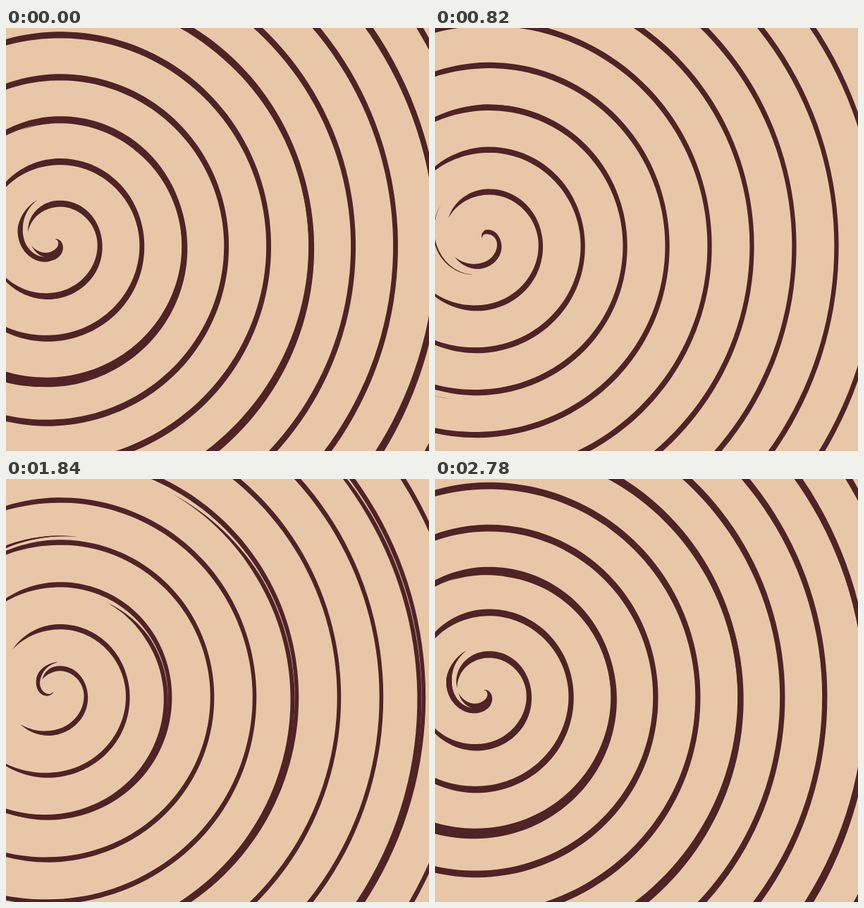
An HTML page with a canvas for the animation above (2.8 s loop, 600 by 600 pixels).

```html
<!DOCTYPE html>
<html lang="en">
<head>
<meta charset="utf-8">
<title>Spiral</title>
<style>
  html, body { margin: 0; width: 100%; height: 100%; overflow: hidden; background: #e8c7a8; }
  canvas { display: block; width: 600px; height: 600px; }
</style>
</head>
<body>
<canvas id="stage" width="600" height="600"></canvas>
<script>
const ctx = document.getElementById('stage').getContext('2d');
const PAPER = '#e8c7a8', INK = '#502327';
const CX = 67.5, CY = 300;
const PITCH = 60;        // distance between turns
const R0 = 65.3;         // radius at angle 0 when the loop starts
const BAND = 180;        // stray strokes repeat at this radius
const CROSSING = 183;    // where a stray stroke crosses the main line
const FULL = 7.4;        // full line weight
const LOOP = 2800, BEAT = 140, STEPS = 60;

const clamp = v => Math.min(1, Math.max(0, v));
const cosDeg = a => Math.cos(a * Math.PI / 180);
const sinDeg = a => Math.sin(a * Math.PI / 180);
const bell = (x, mid, spread) => Math.exp(-(((x - mid) / spread) ** 2));

// Fills a band of changing width along a polar curve; angles in degrees, clockwise.
function ribbon(from, to, radius, width) {
  const n = Math.ceil((to - from) / 2);
  let last = null;
  ctx.beginPath();
  for (let i = 0; i <= n; i++) {
    const a = from + (to - from) * i / n;
    const r = radius(a);
    if (r < 2) continue;
    const h = Math.max(0, width(a, r)) / 2;
    const c = cosDeg(a), s = sinDeg(a);
    const edge = [
      [CX + (r + h) * c, CY + (r + h) * s],
      [CX + (r - h) * c, CY + (r - h) * s]
    ];
    if (last) {
      ctx.moveTo(...last[0][0]);
      for (const e of last.slice(1)) ctx.lineTo(...e[0]);
      ctx.lineTo(...edge[0]);
      ctx.lineTo(...edge[1]);
      for (const e of last.slice(1).reverse()) ctx.lineTo(...e[1]);
      ctx.lineTo(...last[0][1]);
      ctx.closePath();
    }
    // Neighbouring pieces overlap by one segment, so no seams show.
    last = last ? [last[last.length - 1], edge] : [edge];
  }
  ctx.fill();
}

// The line is thinner to the right and fades out towards the left.
function mainWidth(angle, weight) {
  const d = Math.abs(((angle % 360) + 540) % 360 - 180);
  const top = weight * 1.33;
  if (d < 90) return top + (weight - top) * cosDeg(d) ** 6;
  const thin = clamp((FULL - weight) / 4);
  const limit = 118 + 60 * (1 - thin) ** 2;
  return top * (1 - clamp((d - 90) / (limit - 90)) ** 1.5);
}

// Stray strokes open wider than the main line and cross it once in every band.
function stray(base, start, end, weight, taper) {
  if (weight <= 0 || end <= start) return;
  for (let k = -1; k <= 3; k++) {
    const radius = a => {
      const r = base + BAND * k + PITCH * a / 360;
      return r + (r - CROSSING - BAND * k) / 3;
    };
    const width = (a, r) =>
      Math.min(weight * clamp((a - start) / taper) * clamp((end - a) / 50), r * 0.4);
    ribbon(start, end, radius, width);
  }
}

function draw(step) {
  const weight = FULL - 2.5 * bell(step, 10, 8) - 3.9 * bell(step, 46, 7);
  const grow = PITCH * step / (STEPS - 1) - 0.6 * (FULL - weight);
  const base = R0 + grow;

  ctx.fillStyle = PAPER;
  ctx.fillRect(0, 0, 600, 600);
  ctx.fillStyle = INK;

  const angleAt = r => (r - base) / PITCH * 360;
  ribbon(angleAt(2.5), angleAt(625),
    a => base + PITCH * a / 360,
    (a, r) => Math.min(mainWidth(a, weight), r * 0.5));

  // An old stroke breaks off and fades while a fresh one unrolls behind the lead.
  const wide = weight * 1.1;
  const end = 345 - 1.65 * step + 150 * Math.exp(-step / 3);
  const next = base + PITCH;
  stray(next, 253 - 2.5 * step, end, wide, 60);
  stray(next, 41 - 2.5 * step, end, wide * clamp((step - 20) / 12), 30);
  stray(next, 405 + 3.2 * step, 608 - 1.65 * step, wide * (1 - step / 25), 60);
}

// Three pictures per beat, the middle one held longest.
function stepAt(ms) {
  const t = ms % LOOP, m = t % BEAT;
  return Math.floor(t / BEAT) * 3 + (m < 20 ? 0 : m < 120 ? 1 : 2);
}

let shown = -1;
const begin = performance.now();
function tick() {
  const step = stepAt(Math.max(0, performance.now() - begin));
  if (step !== shown) draw(shown = step);
  requestAnimationFrame(tick);
}
tick();
</script>
</body>
</html>
```
